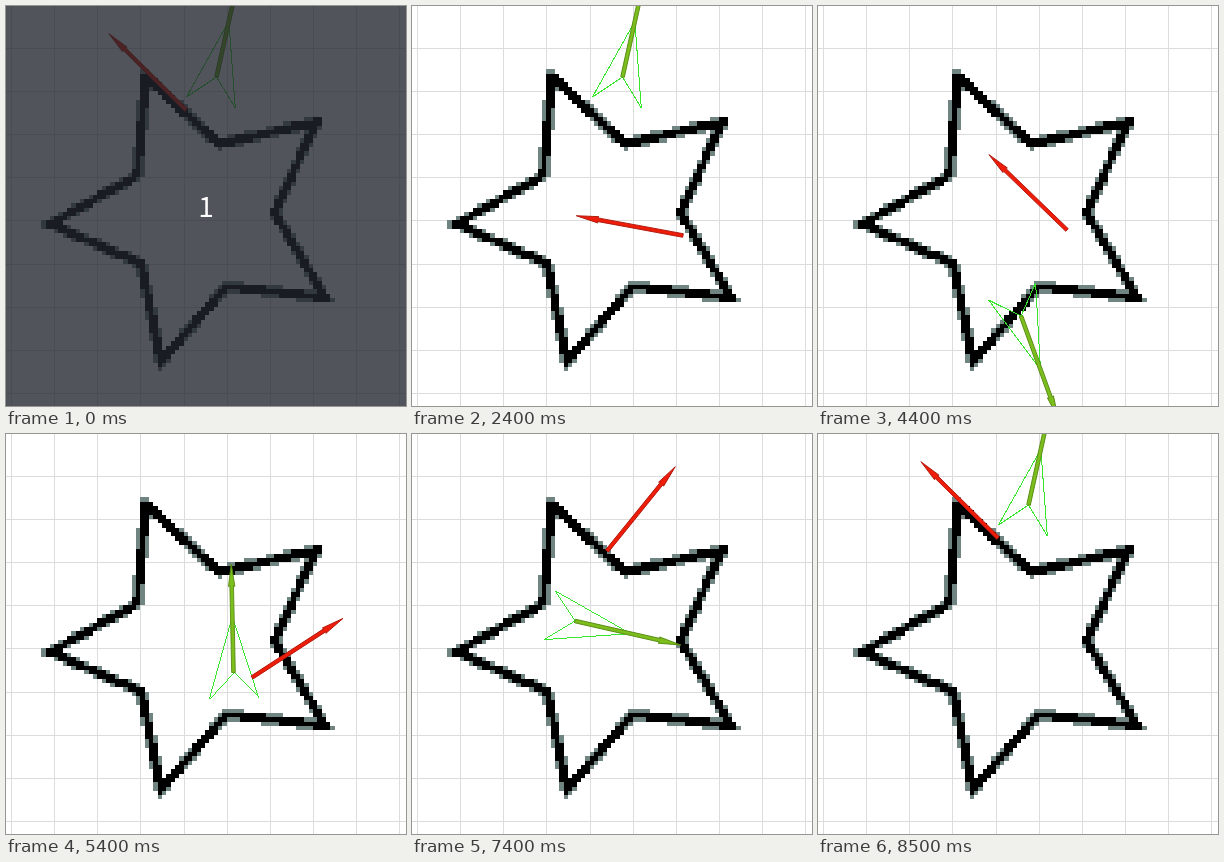
Write an HTML page that moves like this. It is 400 by 400 pixels and loops after 9500 ms.

```html
<!DOCTYPE html>
<html lang="en">
<head>
<meta charset="utf-8">
<title>Star and arrows</title>
<style>
html, body { margin: 0; width: 100%; height: 100%; overflow: hidden; background: #fff; }
svg { display: block; width: 100%; height: 100%; }
text { font: 28px "Noto Sans CJK JP", "Noto Sans CJK SC", Lato, sans-serif; fill: #fff; text-anchor: middle; }
</style>
</head>
<body>
<svg viewBox="0 0 400 400">
  <defs>
    <path id="arrow" d="M0 -1.8H87L86 -3.2L108.5 0L86 3.2L87 1.8H0Z" stroke-width=".9" stroke-linejoin="round"/>
  </defs>
  <path id="grid" stroke="#dcdcdc" shape-rendering="crispEdges"/>
  <path id="soft" fill="#708582" shape-rendering="crispEdges"/>
  <path id="core" shape-rendering="crispEdges"/>
  <g id="green">
    <path d="M0 0L-26 -25L57 0L-26 25Z" fill="none" stroke="#38e62e" shape-rendering="crispEdges"/>
    <use href="#arrow" fill="#7cbe1c" stroke="#588c14"/>
  </g>
  <use id="red" href="#arrow" fill="#ee1c08" stroke="#b01a0e"/>
  <g id="cover">
    <rect width="400" height="400" fill="#21252e" fill-opacity=".78"/>
    <text x="200" y="211">1</text>
  </g>
</svg>
<script>
const LOOP = 9500, COVER = 200, STEP = 1000;
const CELL = 4.315, X0 = 5, Y0 = -1.3;
const STAR = { x: 193.9, y: 210.6, outer: 150, inner: 75, turn: 33 };

// Each pose is tail x, tail y, heading; the first is held, then one per step.
const red = {
  first: 2400, home: 8300,
  poses: [[180, 104, -135.3], [271, 229.5, -169.5], [246, 286, 24.3], [249, 224, -136],
          [246, 243.5, -33], [172, 206, -32], [195, 117, -51]]
};
const green = {
  first: 2500, home: 8500,
  poses: [[210.5, 71, -77.5], [193, 251, -137.5], [203, 310, 70], [227.5, 238.5, -91.2],
          [166, 224, -52], [163, 187, 12.8], [233.5, 79, -39]]
};

const $ = id => document.getElementById(id);
const toX = col => Math.round(X0 + col * CELL);
const toY = row => Math.round(Y0 + row * CELL);

function buildGrid() {
  let d = "";
  for (let i = 0; i < 100; i += 10) d += `M${toX(i) + .5} 0V400M0 ${toY(i) + .5}H400`;
  $("grid").setAttribute("d", d);
}

// Stroke the star at one pixel per cell, then sort cells by coverage.
function buildStar() {
  const size = 94;
  const canvas = document.createElement("canvas");
  canvas.width = canvas.height = size;
  const ctx = canvas.getContext("2d");
  for (let i = 0; i < 10; i++) {
    const r = i % 2 ? STAR.inner : STAR.outer;
    const a = (STAR.turn + i * 36) * Math.PI / 180;
    ctx.lineTo((STAR.x + r * Math.cos(a) - X0) / CELL, (STAR.y + r * Math.sin(a) - Y0) / CELL);
  }
  ctx.closePath();
  ctx.lineWidth = 2;
  ctx.stroke();

  const { data } = ctx.getImageData(0, 0, size, size);
  let core = "", soft = "";
  for (let row = 0; row < size; row++) {
    for (let col = 0; col < size; col++) {
      const ink = data[(row * size + col) * 4 + 3] / 255;
      const box = `M${toX(col)} ${toY(row)}H${toX(col + 1)}V${toY(row + 1)}H${toX(col)}Z`;
      if (ink > .65) core += box;
      else if (ink > .196) soft += box;
    }
  }
  $("core").setAttribute("d", core);
  $("soft").setAttribute("d", soft);
}

function place(id, { first, home, poses }, t) {
  const away = t >= first && t < home;
  const [x, y, a] = poses[away ? 1 + Math.floor((t - first) / STEP) : 0];
  $(id).setAttribute("transform", `translate(${x} ${y}) rotate(${a})`);
}

function draw(t) {
  place("red", red, t);
  place("green", green, t);
  $("cover").setAttribute("visibility", t < COVER ? "visible" : "hidden");
}

buildGrid();
buildStar();
draw(0);
const start = performance.now();
requestAnimationFrame(function tick() {
  draw((performance.now() - start) % LOOP);
  requestAnimationFrame(tick);
});
</script>
</body>
</html>
```
